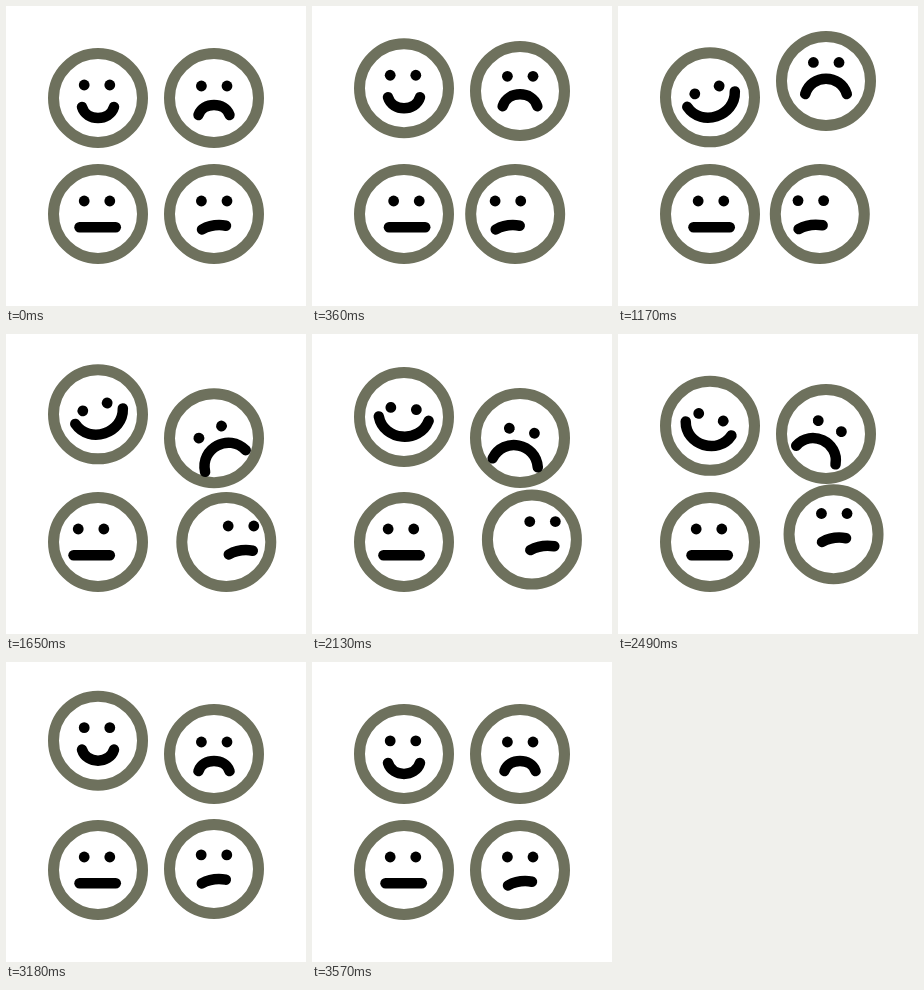
These frames come from a looping animation (300x300 px, 3600 ms). An HTML page:

```html
<!DOCTYPE html>
<html lang="en">
<head>
<meta charset="utf-8">
<title>Four moods</title>
<style>
  html, body { margin: 0; width: 100%; height: 100%; overflow: hidden; background: #fff; }
  svg { display: block; width: 100vw; height: 100vh; }
  .ring { fill: none; stroke: #6e715d; stroke-width: 11; }
  .mouth { fill: none; stroke: #000; stroke-width: 10.5; stroke-linecap: round; }
</style>
</head>
<body>
<svg viewBox="0 0 300 300"></svg>
<script>
const LOOP = 3600;
const svg = document.querySelector('svg');

function add(parent, tag, attrs = {}) {
  const el = document.createElementNS('http://www.w3.org/2000/svg', tag);
  for (const k in attrs) el.setAttribute(k, attrs[k]);
  return parent.appendChild(el);
}

const mix = (a, b, p) => a + (b - a) * p;

// Eased step from 0 to 1 between two times.
function ramp(t, from, to) {
  const p = Math.min(1, Math.max(0, (t - from) / (to - from)));
  return (1 - Math.cos(Math.PI * p)) / 2;
}

// Up during a..b, back down during c..d.
const pulse = (t, a, b, c, d) => ramp(t, a, b) - ramp(t, c, d);

// Rest to lo (a..b), across to hi (c..d), back to rest (e..f).
const swing = (t, lo, hi, a, b, c, d, e, f) =>
  lo * pulse(t, a, b, c, d) + hi * pulse(t, c, d, e, f);

// Positive depth smiles, negative depth frowns.
function arc(w, y, depth) {
  const c = y + depth * 4 / 3;
  return `M${-w} ${y}C${-w * 0.72} ${c} ${w * 0.72} ${c} ${w} ${y}`;
}

const smile = p => arc(mix(16, 25, p), mix(9, -3, p), mix(11, 18, p));
const scowl = p => arc(mix(15.5, 23, p), mix(17, 20.7, p), mix(-10, -17.5, p));

function face(x, y, eyeX, eyeY, mouth) {
  const head = add(svg, 'g');
  add(head, 'circle', { class: 'ring', r: 44.5 });
  const look = add(head, 'g');
  for (const ex of [eyeX, eyeX + 25.6]) add(look, 'circle', { cx: ex, cy: eyeY, r: 5.4 });
  const lips = add(look, 'path', { class: 'mouth', d: mouth });
  return ({ dx = 0, dy = 0, gx = 0, gy = 0, rot = 0, d = mouth }) => {
    head.setAttribute('transform', `translate(${x + dx} ${y + dy})`);
    look.setAttribute('transform', `translate(${gx} ${gy}) rotate(${rot})`);
    lips.setAttribute('d', d);
  };
}

const happy = face(92, 92, -13.8, -13, smile(0));
const sad = face(208, 92, -12.6, -12, scowl(0));
const neutral = face(92, 208, -13.8, -13, 'M-18.5 13.3H17.8');
const unsure = face(208, 208, -12.6, -13, 'M-12 15.5Q-1 9.5 12 11.7');

function drawHappy(t) {
  // Three hops, lagging a little mid-loop.
  const phase = t - 60 * Math.sin(Math.PI * t / LOOP);
  const hop = Math.sin(3 * Math.PI * phase / LOOP) ** 2;
  const grin = pulse(t, 540, 1140, 2340, 3000);
  const rot = swing(t, -18, 18, 690, 1170, 1700, 2430, 2430, 2850);
  happy({ dy: -16 * hop, gx: -0.11 * rot, gy: 4.7 * grin, rot, d: smile(grin) });
}

function drawSad(t) {
  const dy = swing(t, -19.5, 12.3, 0, 880, 1060, 1680, 2000, 3200);
  const rot = swing(t, -28, 28, 1170, 1650, 1650, 2410, 2410, 2820);
  const frown = mix(ramp(t, 0, 900), ramp(t, 1170, 1650), 0.3) - ramp(t, 2250, 3150);
  sad({ dy, gx: -0.06 * rot, gy: 0.38 * dy, rot, d: scowl(frown) });
}

function drawNeutral(t) {
  neutral({ gx: swing(t, 6, -6, 0, 660, 840, 1680, 1680, 2430) });
}

function drawUnsure(t) {
  const dx = swing(t, -9, 12.3, 0, 690, 1020, 1660, 2000, 3150);
  const dy = -10 * pulse(t, 1800, 2800, 2850, 3270);
  const glance = swing(t, -13, 14.5, 0, 660, 1020, 1640, 1850, 2700);
  const lift = -3 * pulse(t, 1020, 1650, 2000, 2600);
  unsure({ dx, dy, gx: glance + 0.2 * dy, gy: lift + 0.95 * dy });
}

const start = performance.now();
function tick() {
  const t = (performance.now() - start) % LOOP;
  for (const draw of [drawHappy, drawSad, drawNeutral, drawUnsure]) draw(t);
  requestAnimationFrame(tick);
}
tick();
</script>
</body>
</html>
```
